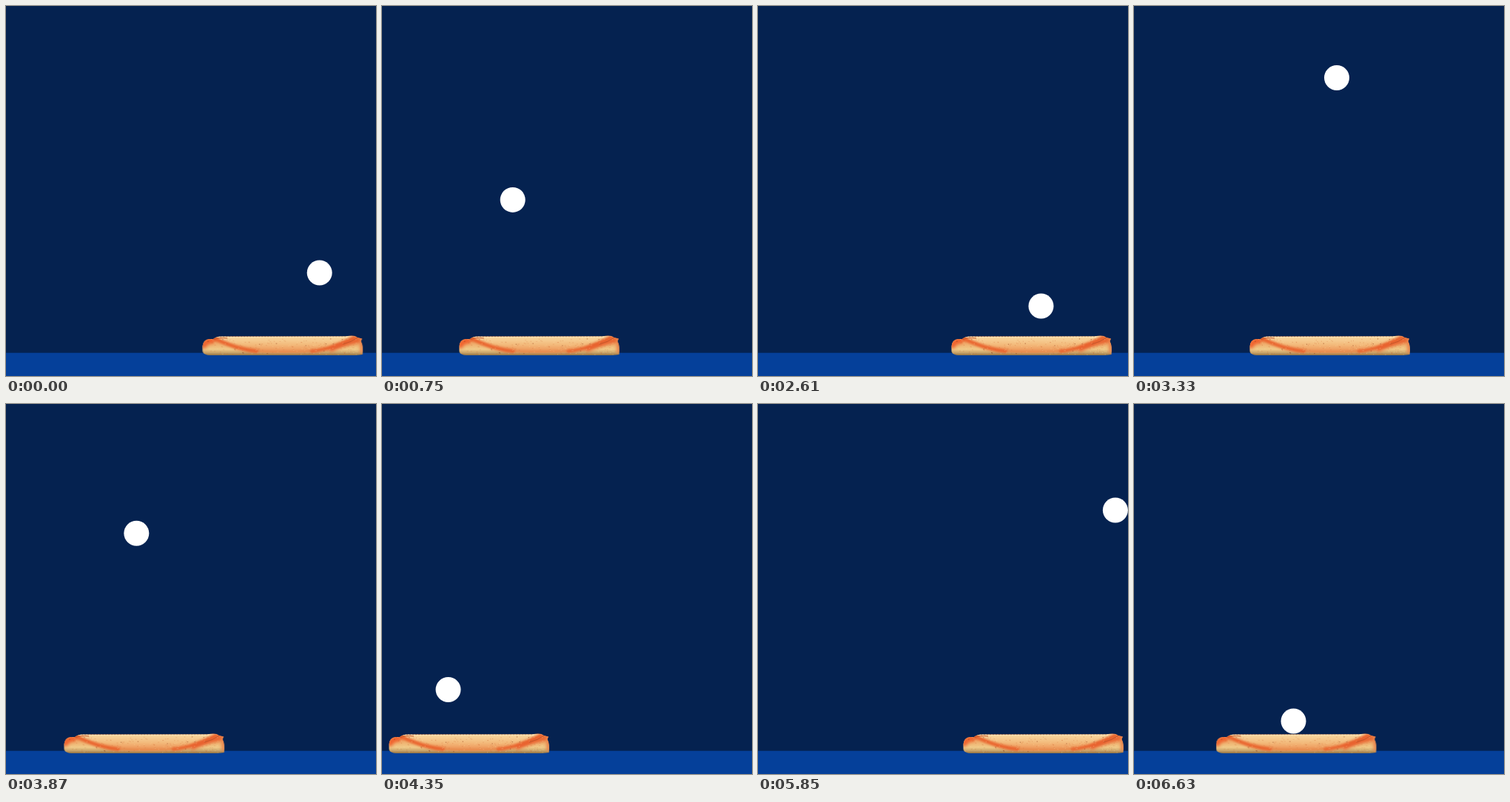
These frames come from a looping animation (500x500 px, 6660 ms). An HTML page with a canvas:

```html
<!DOCTYPE html>
<html>
<head>
<meta charset="utf-8">
<style>
html, body { margin: 0; width: 100%; height: 100%; overflow: hidden; background: #052250; }
canvas { display: block; }
</style>
</head>
<body>
<canvas id="stage" width="500" height="500"></canvas>
<script>
const ctx = document.getElementById('stage').getContext('2d');
const STEP = 30, LOOP = 6660, RADIUS = 17;
const LEFT = 17, RIGHT = 483, CEILING = 17, BUN_LEVEL = 429;
const BUN_Y = 440, BUN_HALF = 108, BUN_MAX = 277;

// The flight as if nothing stopped the ball: step, x, y, and the bun's lead on it.
const flight = [
  [0, 423.7, 360.5, -50.5],
  [53, -100, 860, 131],
  [87, -549.5, 1276.5, -13.5],
  [111, -658, 1585, -10],
  [145, -842.5, 2034, 27.5],
  [168, -1103, 2319.5, 5],
  [221, -1648.5, 2900.5, 3]
];

const clamp = (v, lo, hi) => Math.min(hi, Math.max(lo, v));

// Reflects a free coordinate back and forth between two walls.
function bounce(v, lo, hi) {
  const span = hi - lo, period = 2 * span;
  const d = ((v - lo) % period + period) % period;
  return lo + (d > span ? period - d : d);
}

function poseAt(n) {
  const i = flight.findIndex(key => key[0] >= n) || 1;
  const a = flight[i - 1], b = flight[i], u = (n - a[0]) / (b[0] - a[0]);
  const [, freeX, freeY, lead] = a.map((v, k) => v + (b[k] - v) * u);
  const x = bounce(freeX, LEFT, RIGHT);
  const y = bounce(freeY, CEILING, BUN_LEVEL);
  return { x, y, bun: clamp(x - BUN_HALF + lead, 1, BUN_MAX) };
}

function makeBun() {
  const bun = document.createElement('canvas');
  bun.width = 222;
  bun.height = 36;
  const c = bun.getContext('2d');
  let seed = 7;
  const rnd = () => (seed = seed * 16807 % 2147483647) / 2147483647;
  const blend = (box, ...colors) => {
    const g = c.createLinearGradient(...box);
    colors.forEach((color, i) => g.addColorStop(i / (colors.length - 1), color));
    return g;
  };
  const line = (path, color, width, blur) => {
    c.filter = `blur(${blur}px)`;
    c.strokeStyle = color;
    c.lineWidth = width;
    c.stroke(new Path2D(path));
    c.filter = 'none';
  };
  const speckle = (count, color, size) => {
    c.fillStyle = color;
    for (let i = 0; i < count; i++) c.fillRect(rnd() * 217, 9 + rnd() * 22, size, size);
  };

  c.clip(new Path2D('M.5 20Q1 11 9 10L15 10Q18 7 24 6.500L194 6.500Q205 4 210 8L216 9.500L214.500 13Q218 20 216.500 31L206 32L14 32Q.5 32 .5 26Z'));
  c.fillStyle = blend([0, 8, 0, 32], '#ee8a4e', '#efad6c', '#f0ca88', '#a98650');
  c.fillRect(0, 0, 222, 36);

  // Upper face between the folds, palest in the middle.
  c.fillStyle = blend([0, 6, 0, 29], '#f9dba4', '#f3bb7c', '#ec8b4e');
  c.fill(new Path2D('M18 7C34 17 46 25 74 27Q110 29 146 27C174 24 190 16 207 6Z'));

  line('M14 9C32 15 46 24 76 27', '#e9652f', 5, 1.5);
  line('M76 27Q110 29 146 27', '#e58a4c', 3, 1.5);
  line('M146 27C174 24 190 16 207 7', '#e9652f', 5, 1.5);
  line('M172 25C186 18 200 14 214 11', '#e8602e', 6, 2);
  line('M1 22Q3 12 16 12', '#f0602c', 7, 2);
  line('M216 10V29', '#e87a42', 5, 2);
  line('M15 11Q22 7 34 9', '#c4562a', 1, .4);
  line('M190 17Q202 14 210 8', '#c4562a', 1, .4);
  line('M4 32H216', '#8d7045', 2, 1);
  c.setLineDash([2, 2]);
  line('M22 7.300H198', '#fbe6bc', 1.5, .2);

  speckle(130, 'rgba(205,95,45,.35)', 1);
  speckle(80, 'rgba(255,225,170,.4)', 1);
  speckle(16, 'rgba(150,65,30,.6)', 1.2);
  return bun;
}

const bun = makeBun();
const start = performance.now();

function draw(now) {
  const pose = poseAt(Math.floor(Math.max(0, now - start) % LOOP / STEP));
  ctx.fillStyle = '#052250';
  ctx.fillRect(0, 0, 500, 500);
  ctx.fillStyle = '#05409a';
  ctx.fillRect(0, 468.7, 500, 32);
  ctx.drawImage(bun, pose.bun, BUN_Y);
  ctx.fillStyle = '#fff';
  ctx.beginPath();
  ctx.arc(pose.x, pose.y, RADIUS, 0, 2 * Math.PI);
  ctx.fill();
  requestAnimationFrame(draw);
}
draw(start);
</script>
</body>
</html>
```
